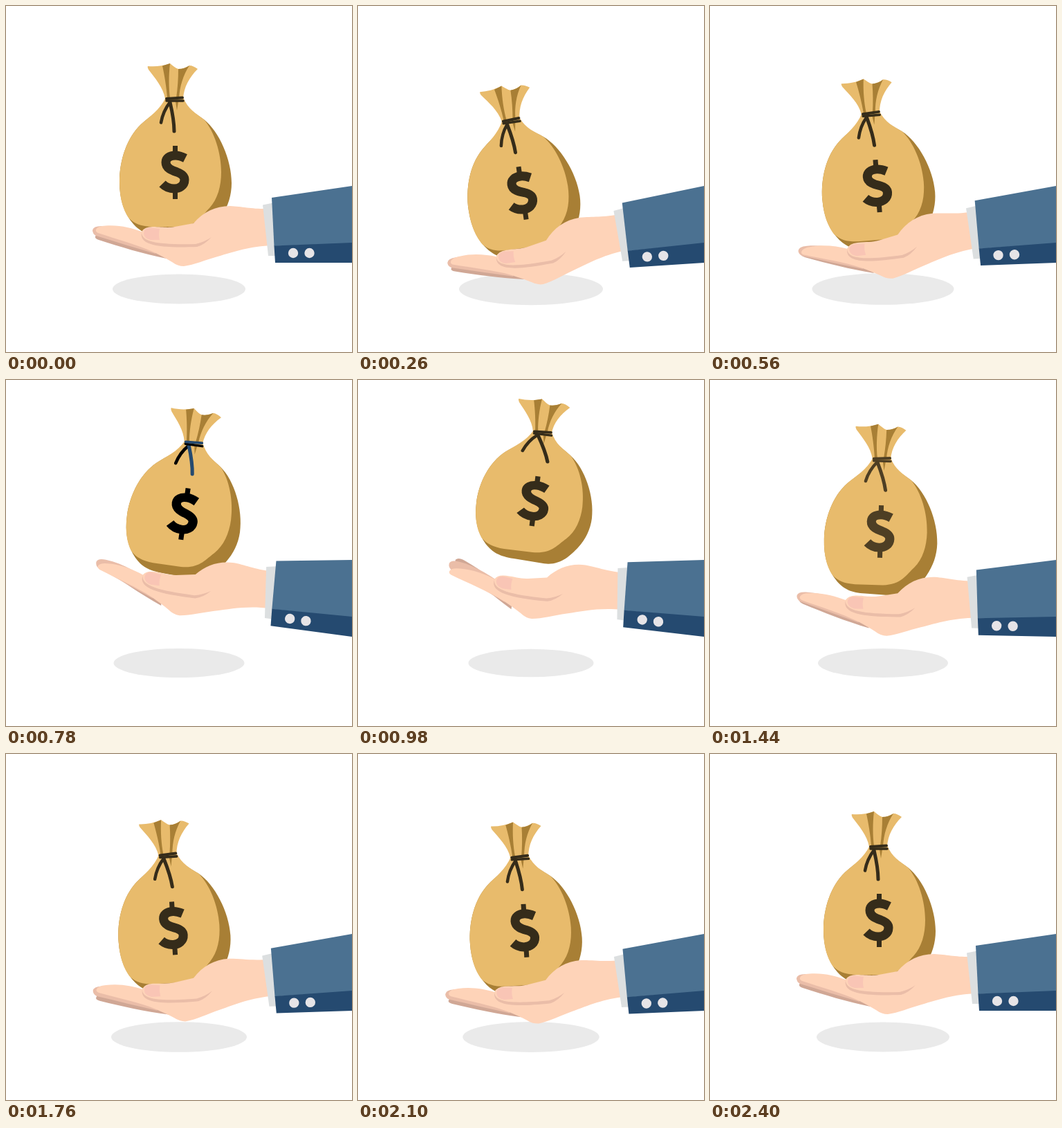
An HTML page that plays this animation: 500 by 500 pixels, repeating every 2.92 s.

```html
<!DOCTYPE html>
<html lang="en">
<head>
<meta charset="utf-8">
<title>Money bag in hand</title>
<style>
  html, body { margin: 0; width: 100%; height: 100%; overflow: hidden; background: #fff; }
  svg { display: block; width: 100vw; height: 100vh; }
  .skin { fill: #fed3b8; }
  .light { fill: #e8bb6c; }
  .dark { fill: #a87f35; }
  .ink { fill: none; stroke: var(--ink); }
  .alt { fill: none; stroke: var(--alt); }
</style>
</head>
<body>
<svg id="stage" viewBox="0 0 500 500">
  <ellipse id="shadow" cx="250" cy="409" fill="#eaeaea"/>

  <g class="hand">
    <path id="back" fill="#d0a795" d="M129 333Q131 328 142 329C170 331 200 340 228 352L232 365C198 358 165 348 134 338Q128 336 129 333Z"/>
    <path id="mid" fill="#eabda8" d="M125 324Q126 318 138 318C165 318 190 327 216 338V358C188 350 160 341 130 332Q125 329 125 324Z"/>
  </g>

  <g id="bag">
    <path class="dark" d="M231 138C222 151 207 160 195 171C175 190 164 222 164 254C164 280 171 300 184 315C195 327 205 331 225 332L268 334C290 334 302 318 312 303C321 289 326 273 326 256C326 222 308 181 286 164C274 155 263 149 256 138Z"/>
    <path class="light" d="M231 132C222 151 207 160 195 171C175 190 164 222 164 254C164 277 169 294 177 306C186 315 194 318 210 319L250 319C276 318 283 303 294 292C306 279 311 260 311 240C311 212 301 181 286 164C274 155 263 149 256 132Z"/>
    <path class="light" d="M205 87C215 88 226 87 237 83C241 86 245 90 249 91C255 91 260 89 265 86C269 86 273 88 277 91C265 103 257 117 256 134H230C227 117 215 104 206 92Q204 88 205 87Z"/>
    <path class="dark" d="M226 86.500L237 83C235 100 235 118 237 133H233C232 118 229 100 226 86.500ZM249 91Q258 91 265 86C256 100 251 116 250 133H246C248 119 249 105 249 91ZM245 138H249L247 151Z"/>
    <path id="tailL" class="ink" stroke-width="4.500" stroke-linecap="round" d="M237 139C230 148 226 157 224 168.500"/>
    <path id="tailR" class="alt" stroke-width="5" stroke-linecap="round" d="M237 139C240 152 243 165 243 181"/>
    <path class="ink" stroke-width="3.600" stroke-linecap="round" d="M232 137L256 137"/>
    <path class="alt" stroke-width="4" stroke-linecap="round" d="M232 134L255 132.500"/>
    <path class="ink" stroke-width="13" d="M259 220C253 217 249 216 245 216C236 216 231 220 231 226C231 235 241 238 247 240C255 243 258 246 258 251C258 260 250 264 243 264C237 264 231 262 226 257"/>
    <path class="ink" stroke-width="7" d="M244.500 202V214M244.500 266V279"/>
  </g>

  <g class="hand">
    <path class="skin" d="M130 323Q132 318 144 317.500C164 316 182 321 196 326Q200 319 212 319C226 319 232 321 244 319L271 314C285 298 302 289 324 289C344 290 355 294 386 293V346C352 347 330 355 306 362C288 367 272 374 257 376Q248 376 240 370C232 365 224 361 214 356C190 345 160 337 133 328Q129 326 130 323Z"/>
    <path fill="#eabda8" d="M196 327C196 342 222 345 274 344Q287 341 297 334Q287 345 276 348C222 350 192 346 196 327Z"/>
    <path fill="#f9c5b5" d="M199 329Q199 321 208 320.500L222 322Q220 330 222 338L209 338Q200 336 199 329Z"/>
  </g>

  <path id="shirt" fill="#dcdfe0"/>
  <path id="sleeve" fill="#4b7191"/>
  <path id="cuff" fill="#254a70"/>
  <g id="buttons" fill="#e6e4e7">
    <circle cx="415" cy="357" r="7.200"/>
    <circle cx="438.500" cy="357" r="7.200"/>
  </g>
</svg>
<script>
const LOOP = 2920, STEP = 20, END = 2400;
const $ = id => document.getElementById(id);
const hands = document.querySelectorAll('.hand');

// Smooth curve through [time, value] points, flat at every turning point.
function track(...pts) {
  const last = pts.length - 1;
  const slope = i => (pts[i + 1][1] - pts[i][1]) / (pts[i + 1][0] - pts[i][0]);
  const tangent = pts.map((_, i) => {
    if (i === last) return 0;
    if (i === 0) return slope(0) * 1.2;
    const a = slope(i - 1), b = slope(i);
    return a * b <= 0 ? 0 : 2 * a * b / (a + b);
  });
  return t => {
    let i = 0;
    while (i < last - 1 && t >= pts[i + 1][0]) i++;
    const [t0, v0] = pts[i], [t1, v1] = pts[i + 1];
    const h = t1 - t0, u = Math.min(1, (t - t0) / h), w = 1 - u;
    return w * w * (1 + 2 * u) * v0 + u * u * (3 - 2 * u) * v1
         + h * u * w * (w * tangent[i] - u * tangent[i + 1]);
  };
}

const arm = track([0, 0], [260, -3.7], [390, -4.4], [540, -2.6], [780, 7.9], [830, 8.2],
  [1160, 4.3], [1440, 1.2], [1760, -1.8], [1970, -2.9], [2160, -2], [END, 0]);
const wrist = track([0, 0], [260, -5.2], [390, -6.2], [540, -4.6], [780, 0.8],
  [1160, 0.2], [1440, 0.5], [1760, -1.3], [1970, -2.1], [END, 0]);
const bagX = track([0, 243.5], [260, 236.5], [390, 235.5], [540, 240], [780, 257],
  [1160, 251], [1440, 245.5], [1760, 241], [1970, 239.5], [END, 243.5]);
const bagY = track([0, 240], [260, 270], [390, 275], [540, 263], [780, 193], [1000, 174],
  [1080, 173], [1160, 181], [1440, 218.5], [1760, 251.5], [1970, 259], [2160, 252], [END, 240]);
const tilt = track([0, 0], [260, -8.3], [390, -9], [540, -5.5], [780, 8], [840, 8.4],
  [1160, 4.1], [1440, 1.6], [1760, -3.8], [1970, -4.6], [END, 0]);
const squash = track([0, 0], [260, 0], [780, 0.028], [1120, 0.076], [1160, 0.075],
  [1440, 0.015], [1760, 0], [END, 0]);
const spread = track([0, 0], [260, 0], [780, 6], [1130, 22], [1160, 22], [1440, 9],
  [1760, 5], [END, 0]);
const curl = track([0, 0], [260, 0], [780, 9], [1100, 20], [1160, 20], [1440, 3],
  [1760, -1], [END, 0]);
const shade = track([0, 96], [260, 104], [390, 105.5], [540, 103], [780, 94.5], [1060, 90],
  [1160, 90.5], [1440, 94], [1760, 98], [1970, 99.5], [END, 96]);

// Ink switches hard between tones: start time, ink, second ink.
const inks = [
  [0, '#352c1a', '#352c1a'], [700, '#000', '#254a70'],
  [880, '#352c1a', '#352c1a'], [1300, '#4e3f24', '#4e3f24'], [1600, '#352c1a', '#352c1a']
];

const PIVOT = [500, 316];
function turn(deg, x, y) {
  const r = deg * Math.PI / 180, c = Math.cos(r), s = Math.sin(r);
  const dx = x - PIVOT[0], dy = y - PIVOT[1];
  return `${PIVOT[0] + dx * c - dy * s} ${PIVOT[1] + dx * s + dy * c}`;
}
const set = (id, name, value) => $(id).setAttribute(name, value);
const move = (id, value) => set(id, 'transform', value);

function draw(t) {
  const a = arm(t), p = (x, y) => turn(a, x, y), swing = `rotate(${a} ${PIVOT})`;

  // The sleeve's right end stays fixed at the stage edge.
  set('shirt', 'd', `M${p(371, 287.5)}L${p(386, 284.5)}L${p(390, 361)}L${p(379, 361)}Z`);
  set('sleeve', 'd', `M${p(384, 277)}L500 260V343L${p(387.5, 347)}Z`);
  set('cuff', 'd', `M${p(387.5, 346.5)}L500 342V371L${p(389, 371)}Z`);
  move('buttons', swing);

  hands.forEach(h => h.setAttribute('transform', `${swing} rotate(${wrist(t)} 380 320)`));
  const c = curl(t);
  move('back', `rotate(${c} 225 345)`);
  move('mid', `rotate(${c * 0.4} 225 345)`);

  const q = squash(t), s = spread(t);
  move('bag', `translate(${bagX(t)} ${bagY(t)}) rotate(${tilt(t)}) ` +
    `scale(${1 + q * 0.65} ${1 - q}) translate(-243.5 -240)`);
  move('tailL', `rotate(${s * 0.6} 238 137)`);
  move('tailR', `rotate(${-s} 238 137)`);

  const [, ink, alt] = inks.filter(k => k[0] <= t).pop();
  $('stage').style.setProperty('--ink', ink);
  $('stage').style.setProperty('--alt', alt);

  const rx = shade(t);
  set('shadow', 'rx', rx);
  set('shadow', 'ry', rx * 0.223);
}

const start = performance.now();
function tick(now) {
  const t = Math.max(0, now - start) % LOOP;
  draw(Math.min(END, Math.floor(t / STEP) * STEP));
  requestAnimationFrame(tick);
}
draw(0);
requestAnimationFrame(tick);
</script>
</body>
</html>
```
